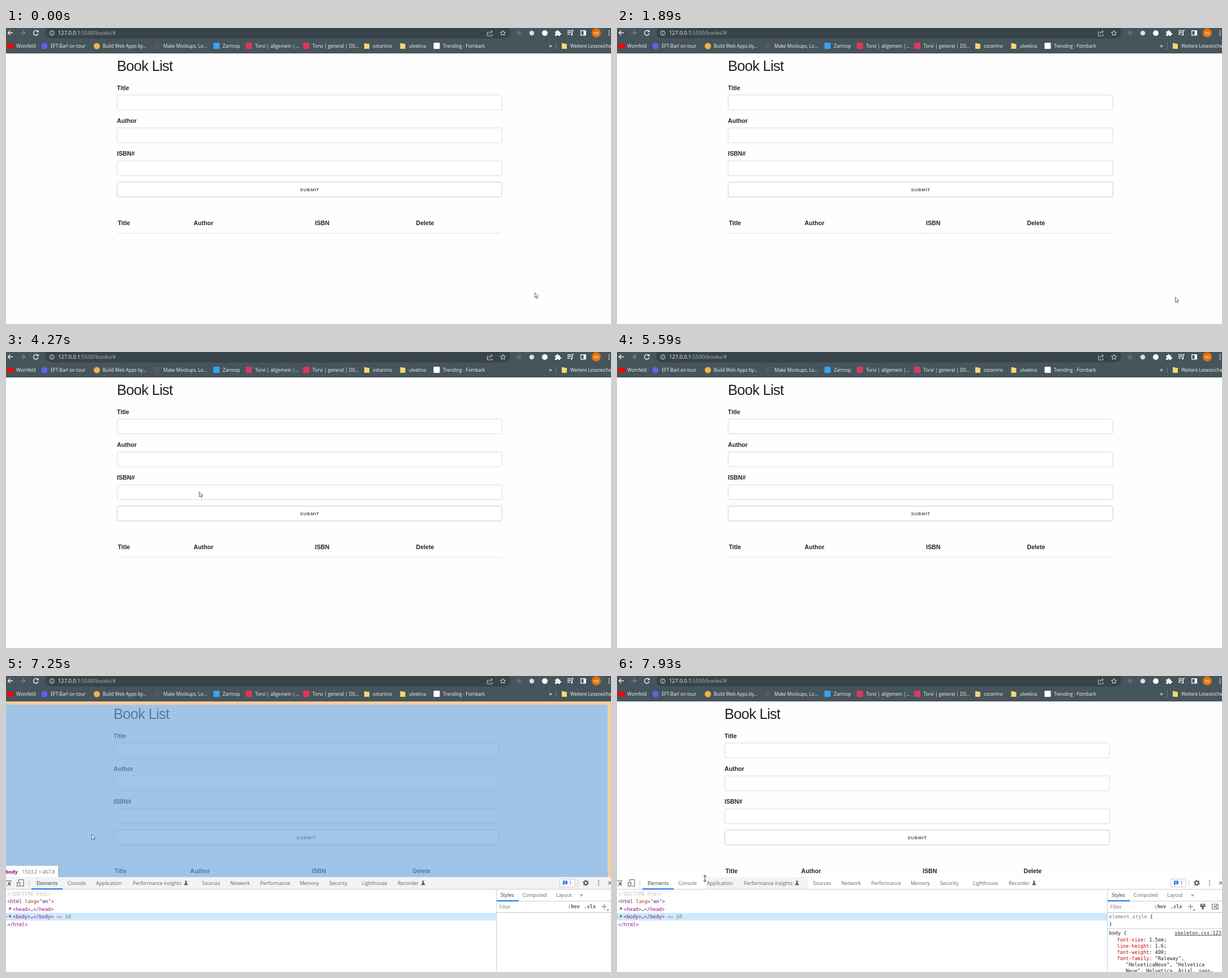
These frames come from a looping animation (1069 px wide and 524 px high, 8 s). An HTML page:

```html
<!DOCTYPE html>
<html lang="en">
<head>
<meta charset="utf-8">
<title>Book List</title>
<style>
html, body { margin: 0; width: 100%; height: 100%; overflow: hidden; background: #fefefe; }
svg { display: block; }
text { white-space: pre; }
.ui { font-family: "Open Sans", "Noto Sans", sans-serif; }
.page { font-family: "Liberation Sans", Arial, sans-serif; }
.code { font: 8.57px "DejaVu Sans Mono", monospace; }
.bold { font-weight: bold; }
</style>
</head>
<body>
<svg id="stage" width="1069" height="524" viewBox="0 0 1069 524"></svg>
<script>
const esc = s => s.replace(/&/g, '&amp;').replace(/</g, '&lt;');
const text = (x, y, s, cls, size, fill, extra = '') =>
  `<text x="${x}" y="${y}" class="${cls}" style="font-size:${size}px" fill="${fill}" ${extra}>${esc(s)}</text>`;
const rect = (x, y, w, h, fill, extra = '') =>
  `<rect x="${x}" y="${y}" width="${w}" height="${h}" fill="${fill}" ${extra}/>`;
const dot = (x, y, r, fill) => `<circle cx="${x}" cy="${y}" r="${r}" fill="${fill}"/>`;
const line = (d, stroke, w = 1) => `<path d="${d}" fill="none" stroke="${stroke}" stroke-width="${w}"/>`;
const shape = (d, fill) => `<path d="${d}" fill="${fill}"/>`;
const group = (id, body, extra = '') => `<g id="${id}" ${extra}>${body}</g>`;
const code = (x, y, parts) => `<text x="${x}" y="${y}" class="code">` +
  parts.map(([fill, s, style = '']) => `<tspan fill="${fill}" style="${style}">${esc(s)}</tspan>`).join('') + '</text>';

function browserBar() {
  const white = '#f1f3f4', bar = '#46555c';
  const folder = x => shape(`M${x} 27h4l1 1h4v9h-9z`, '#f7d774') + rect(x, 36, 9, 1, '#e5b94e');
  const square = (x, fill) => rect(x, 26, 11, 11, fill, 'rx="1.5"');
  const marks = [
    [18, 'Womfeld'], [79, 'EFT-Barl on tour'], [171, 'Build Web Apps by...'],
    [278, 'Make Mockups, Lo...'], [383, 'Zarmop'], [440, 'Torvi | allgemein |...'],
    [541.5, 'Torvi | general | D0...'], [648, 'ostarimo'], [712, 'ulvetina'],
    [772, 'Trending - Fombark'], [997, 'Weitere Lesezeichen']
  ];
  return rect(0, 0, 1069, 45, bar) +
    rect(69, -4, 822, 22.5, '#39444a', 'rx="11"') +
    line('M12 8.5H3.5M7.5 4.5l-4 4 4 4', white, 1.3) +
    line('M25 8.5h8.5M29.5 4.5l4 4-4 4', '#87949a', 1.2) +
    line('M56.3 6.2a4.2 4.2 0 1 0 .6 3.6', white, 1.4) + shape('M57.6 3.6v4h-4z', white) +
    `<circle cx="81" cy="9" r="4" fill="none" stroke="#d5dadc"/>` + line('M81 8.3v3M81 6.2v1.1', '#d5dadc') +
    `<text x="92" y="12.3" class="ui" style="font-size:9.3px" fill="#f5f6f7">127.0.0.1<tspan fill="#aeb7bb">:5500/books/#</tspan></text>` +
    line('M853 7h-2.5v7h8.5v-3M853.5 11c0-3 2-4.5 5.5-4.5M856.5 4l3 2.6-3 2.6', '#c3cacd') +
    `<path d="M878 4.2l1.4 3.1 3.3.3-2.5 2.2.8 3.3-3-1.8-3 1.8.8-3.3-2.5-2.2 3.3-.3z" fill="none" stroke="#d5dadc"/>` +
    dot(906.5, 9, 4.3, '#5d6b71') + dot(929, 9, 4.3, '#d9dee0') + dot(952, 9, 5, '#fff') +
    shape('M970 6h3a1.6 1.6 0 1 1 3 0h3v3a1.6 1.6 0 1 1 0 3v2h-3a1.5 1.5 0 1 0-3 0h-3v-3a1.5 1.5 0 1 0 0-3z', white) +
    line('M992 5h7M992 8h7M992 11h4M1000.5 12V4.5h2.5', white, 1.3) + dot(999.4, 11.8, 1.6, white) +
    `<rect x="1015.7" y="4.7" width="8.6" height="8" fill="none" stroke="${white}" stroke-width="1.4"/>` + rect(1020.5, 4.5, 4, 8.5, white) +
    dot(1043, 8.5, 8, '#e8710a') + text(1043, 11.5, 'm', 'ui', 9, '#fff', 'text-anchor="middle"') +
    [5, 8.8, 12.6].map(y => dot(1065.5, y, 1.1, white)).join('') +
    rect(2, 28, 12, 8, '#f00', 'rx="2"') + dot(68, 32, 5.5, '#5865f2') + dot(160.5, 32, 5.5, '#f0b445') +
    rect(262, 27, 9, 10, '#5a5858') + square(366.5, '#37a3f2') +
    square(423.5, '#e0365f') + square(525, '#e0365f') +
    folder(633) + folder(696.5) + square(755.5, '#fff') + folder(982) +
    text(959.5, 34.5, '»', 'ui', 10.5, '#fff') + line('M972.5 26v12', '#6f7c82') +
    marks.map(([x, s]) => text(x, 34.8, s, 'ui', 8.2, '#f5f6f7')).join('');
}

function page() {
  const box = (y, stroke, id = '') =>
    `<rect ${id} x="196.35" y="${y}" width="680" height="26.2" rx="2.8" fill="#fff" stroke="${stroke}" stroke-width=".8"/>`;
  const bold = (x, y, s) => text(x, y, s, 'page bold', 10.65, '#222');
  return text(196, 75.6, 'Book List', 'page', 25.5, '#222', 'letter-spacing="-0.71"') +
    bold(196, 110, 'Title') + box(118.55, '#d1d1d1') +
    bold(196, 167.8, 'Author') + box(176.85, '#d1d1d1') +
    bold(196, 226.2, 'ISBN#') + box(235.15, '#d1d1d1') +
    box(272.8, '#bbb', 'id="button"') +
    text(519.6, 288.8, 'SUBMIT', 'page bold', 7.8, '#555', 'letter-spacing="0.71" id="submit"') +
    [[197.5, 'Title'], [331.5, 'Author'], [546, 'ISBN'], [724.5, 'Delete']].map(([x, s]) => bold(x, 349.4, s)).join('') +
    line('M197 363.4H533M535 363.4H714M716 363.4H875', '#e1e1e1');
}

const highlight = () =>
  rect(0, 45, 1069, 5.7, '#f6b26b', 'opacity=".66"') +
  rect(1063.3, 50.7, 5.7, 305.3, '#f6b26b', 'opacity=".66"') +
  rect(0, 50.7, 1063.3, 305.3, '#6fa8dc', 'opacity=".66"') +
  rect(-6, 337, 100, 22, '#000', 'rx="3" opacity=".18"') +
  rect(-6, 336, 98.5, 22, '#fff', 'rx="2"') +
  text(-.5, 350, 'body', 'ui bold', 8.6, '#881280') +
  text(28.5, 350, '1503.2 × 467.8', 'ui', 8.55, '#6b6f73');

function tools() {
  const ink = '#5f6368', edge = '#cacdd1';
  const flask = x => shape(`M${x - 2} 362.5h4v1h-.8v2.2l2.6 4.6h-7.6l2.6-4.6v-2.2h-.8z`, ink);
  const tabs = [[54, 'Elements'], [108.5, 'Console'], [159, 'Application'], [224, 'Performance insights'],
    [346.5, 'Sources'], [396.3, 'Network'], [449.3, 'Performance'], [519, 'Memory'],
    [571, 'Security'], [628.7, 'Lighthouse'], [692, 'Recorder']];
  const side = [[874, 'Styles'], [912.7, 'Computed'], [972, 'Layout']];
  const label = ([x, s], i, y) => text(x, y, s, 'ui', 8.7, i ? ink : '#333');
  return group('tint', rect(0, 356, 1069, 21, '#f1f3f4')) +
    group('sideTint', rect(867, 377, 202, 41, '#f1f3f4') + rect(868, 400, 118, 17, '#fff')) +
    `<rect id="patch" y="356" height="21" fill="#f1f3f4"/>` +
    line('M0 377.5H1069M866.5 377V524M867 398.5H1069', edge) + line('M867 418.7H1069', '#b9bcc0') +
    line('M4 370.5H1M0 362.5H8.5v2.5', ink, 1.2) + shape('M3 364.5l6.5 2.6-2.7 1 2.2 2.4-1 .9-2.2-2.4-1 2.4z', ink) +
    line('M22.5 364.5v-4H31v11.5H26M19.6 365.5h5v6.5h-5z', ink, 1.1) +
    line('M40.5 361v12M1010.5 361v12', edge) +
    tabs.map((tab, i) => label(tab, i, 370.2)).join('') + flask(318) + flask(737) +
    rect(45, 376, 55, 2, '#1a73e8') +
    `<circle cx="1024.5" cy="366.3" r="3" fill="none" stroke="${ink}" stroke-width="2.2"/>` +
    `<circle cx="1024.5" cy="366.3" r="4.6" fill="none" stroke="${ink}" stroke-width="1.7" stroke-dasharray="2.2 2.6"/>` +
    [362.5, 366.3, 370].map(y => dot(1047, y, 1, ink)).join('') +
    line('M1064.5 363.5l5.5 5.5M1070 363.5l-5.5 5.5', ink, 1.2) +
    side.map((tab, i) => label(tab, i, 391.3)).join('') +
    text(1014, 391, '»', 'ui', 11, ink) + rect(867, 397, 39, 2, '#1a73e8') +
    text(871.5, 412, 'Filter', 'ui', 8.7, '#757575');
}

const toggles = () =>
  code(0, 411.3, [['#4a4e52', ':hov', 'font-weight:bold']]) + code(28.5, 411.3, [['#4a4e52', '.cls', 'font-weight:bold']]) +
  line('M59.5 408.3h9M64 403.8v9', '#6e7377', 1.1) + shape('M71.5 412v3.4h-3.4z', '#6e7377');

function dom() {
  const tag = '#881280', grey = '#80868b';
  const arrow = y => shape(`M5.5 ${y - 3}l4.5 3-4.5 3z`, '#6e6e6e');
  return rect(978.5, 359.5, 26.5, 14, '#fff', 'stroke="#cacdd1" rx="1.5"') +
    shape('M984 362.5h8v6h-5.5l-2.5 2z', '#1a73e8') + line('M985.5 364.7h5M985.5 366.7h3.5', '#fff', .8) +
    text(995, 370, '1', 'ui', 8.7, '#5f6368') +
    code(2.3, 388.6, [['#c0c0c0', '<!DOCTYPE html>']]) +
    code(2.3, 402.1, [[tag, '<html '], ['#994500', 'lang'], [tag, '="'], ['#1a1aa6', 'en'], [tag, '">']]) +
    arrow(411.7) + code(12, 415.6, [[tag, '<head>'], ['#333', '…'], [tag, '</head>']]) +
    rect(0, 419.3, 866, 13.6, '#cfe8fc') + rect(0, 425.7, 2.5, 1, '#6e6e6e') +
    arrow(425.2) + code(12, 429.2, [[tag, '<body>'], ['#333', '…'], [tag, '</body>'], [grey, ' == $0', 'font-style:italic']]) +
    code(2.3, 442.6, [[tag, '</html>']]);
}

function styles() {
  const rule = (y, name, value) => code(883.5, y, [['#c80000', name], ['#222', ': ' + value]]);
  return code(869.5, 429.3, [['#777', 'element.style'], ['#222', ' {']]) + code(869.5, 442.3, [['#222', '}']]) +
    line('M867 447.5H1069', '#cacdd1') +
    code(869.5, 457.8, [['#222', 'body {']]) +
    code(985.3, 457.8, [['#333', 'skeleton.css:123', 'text-decoration:underline']]) +
    rule(470, 'font-size', '1.5em;') + rule(480.9, 'line-height', '1.6;') +
    rule(491.8, 'font-weight', '400;') + rule(502.7, 'font-family', '"Raleway",') +
    code(899, 513.6, [['#222', '"HelveticaNeue", "Helvetica']]) +
    code(899, 524.5, [['#222', 'Neue", Helvetica, Arial, sans-']]) +
    shape('M1030.5 403.5h9v5.5h-9z', '#5f6368') + line('M1032 405.5h6', '#fff') + rect(1033.5, 409, 3, 4.5, '#5f6368') +
    `<rect x="1051.5" y="404" width="10.5" height="8.5" fill="none" stroke="#5f6368"/>` + line('M1059.5 404v8.5', '#5f6368') +
    shape('M1057.5 405.7v5l-3.6-2.5z', '#5f6368');
}

const resizeArrow = 'M155.3 353V364M152.8 355.2l2.5-2.7 2.5 2.7M152.8 361.8l2.5 2.7 2.5-2.7';
const stage = document.getElementById('stage');
stage.innerHTML = rect(0, 0, 1069, 524, '#fefefe') + group('page', page()) + browserBar() +
  group('highlight', highlight()) +
  group('panel', rect(0, 356, 1069, 168, '#fff')) +
  group('tools', tools() + group('toggles', toggles())) + group('dom', dom()) + group('styles', styles()) +
  group('arrow', '<path d="M.5 .6V9.4L2.5 7.6 4 10.7 5.3 10.1 3.9 7 6.6 6.8Z" fill="#fff" stroke="#333" stroke-width=".75" stroke-linejoin="round"/>') +
  group('resize', line(resizeArrow, '#fff', 2.6) + line(resizeArrow, '#333'));

// Pointer steps: time, x, y; no position means off stage.
const pointer = [
  [0, 934, 468], [590, 946, 472], [740, 991, 485], [1420, 989, 481], [1580, 987, 477],
  [1740, 987, 476], [1890, 986, 476], [2320, 1000, 493], [2460, 1019, 508], [2590, 1037, 523], [2730],
  [3440, 907, 405], [3570, 750, 285], [3720, 600, 205], [3850, 455, 125], [4000, 350, 118],
  [4130, 273, 134], [4270, 341, 247], [4420, 385, 285], [4540, 463, 345], [4660, 400, 325],
  [4810, 338, 311], [4930, 483, 366], [5080, 700, 420], [5200, 920, 465], [5320, 1062, 493],
  [5470, 1054, 515], [5590], [6720, 151, 280], [7380, 189, 311], [7530, 331, 378],
  [7660, 204, 374], [7800, 178, 364], [7930]
];

const $ = id => document.getElementById(id);
const show = (id, on) => { $(id).style.display = on ? '' : 'none'; };

function draw(t) {
  const [, x, y] = pointer.findLast(step => step[0] <= t);
  show('arrow', x !== undefined);
  if (x !== undefined) $('arrow').setAttribute('transform', `translate(${x} ${y})`);
  show('resize', t >= 7930);

  const hover = t >= 3570 && t < 3720;
  $('button').setAttribute('stroke', hover ? '#888' : '#bbb');
  $('submit').setAttribute('fill', hover ? '#333' : '#555');

  $('page').setAttribute('transform', `translate(${t >= 7000 ? -6 : 0} 0)`);
  show('panel', t >= 7000);
  show('tools', t >= 7120);
  show('highlight', t >= 7250 && t < 7380);
  show('dom', t >= 7250);
  show('styles', t >= 7380);
  show('tint', t < 7380);
  show('sideTint', t < 7250);
  $('toggles').setAttribute('transform', `translate(${t >= 7380 ? 949.5 : 993} 0)`);

  const left = t >= 7800 ? 158 : 189;
  show('patch', t >= 7530);
  $('patch').setAttribute('x', left);
  $('patch').setAttribute('width', 338 - left);
}

function tick() {
  draw(performance.now() % 8000);
  requestAnimationFrame(tick);
}
tick();
</script>
</body>
</html>
```
